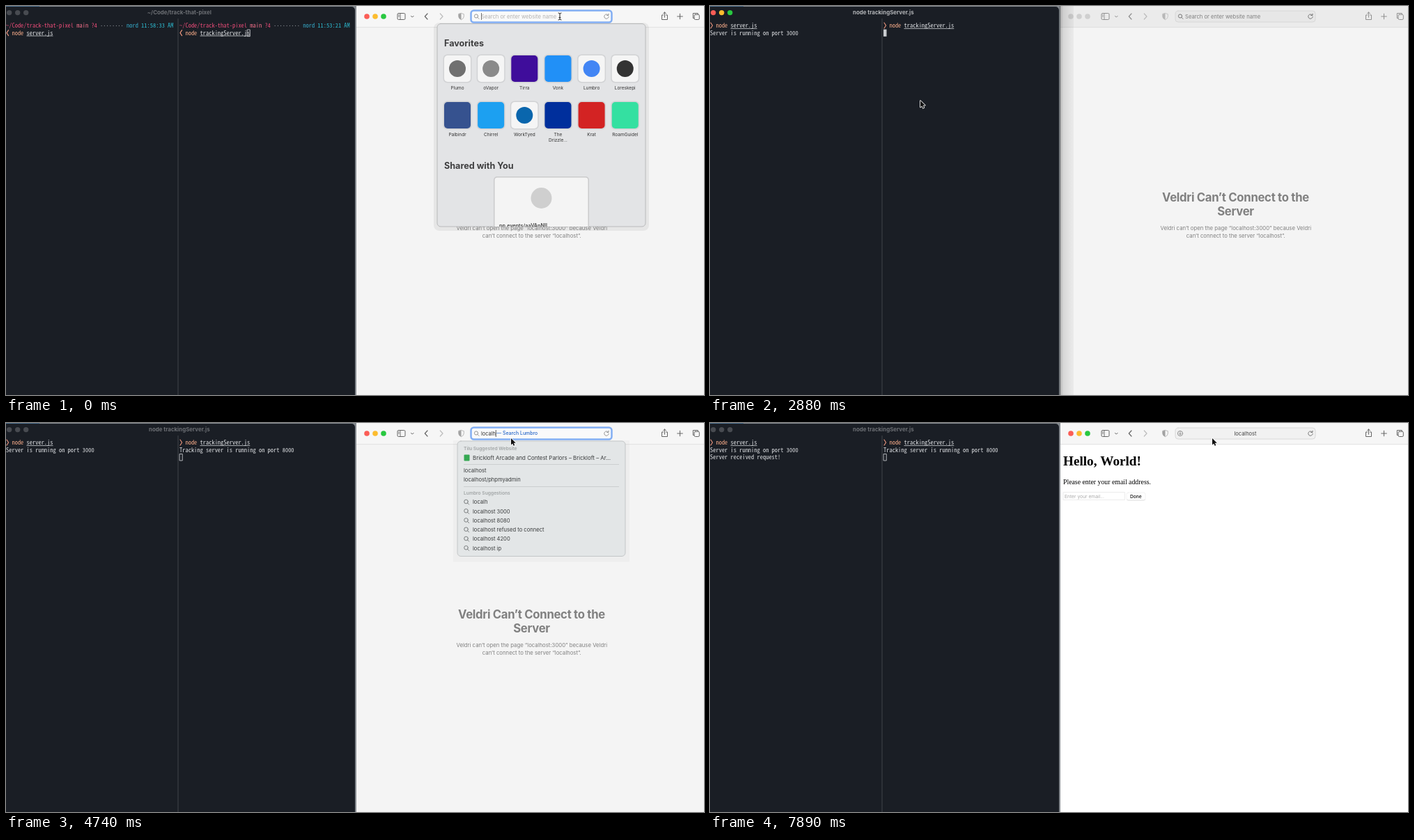
These frames come from a looping animation (1002 px wide and 559 px high, 8000 ms). An HTML page with a canvas:

```html
<!DOCTYPE html>
<html lang="en">
<head>
<meta charset="utf-8">
<title>Two servers and a browser</title>
<style>
html, body { margin: 0; width: 100%; height: 100%; overflow: hidden; }
canvas { display: block; }
</style>
</head>
<body>
<canvas id="stage" width="1002" height="559"></canvas>
<script>
const c = document.getElementById('stage').getContext('2d');
const LOOP = 8000;
const UI = 'Inter, "Open Sans", sans-serif';
const SERIF = '"Liberation Serif", serif';
const MONO = '8.45px "Noto Sans Mono CJK JP", "Noto Sans Mono", monospace';
const CELL = 4.22;
const URL_TEXT = 'localhost:3000';
const LIGHTS = ['#fb5d56', '#fcbc2e', '#28c840'];

// Moments at which something switches
const LEAVE = 760, LEFT_PANE = 1530, RUN_LEFT = 1830, LOG_LEFT = 2130, RIGHT_PANE = 2580,
  RUN_RIGHT = 2880, LOG_RIGHT = 3030, RETURN = 3480, ENTER = 6520, LOADED = 6670, DONE = 7150;

const pointer = [
  [0, 795, 15, 'beam'], [150, 770, 38], [300, 640, 80], [450, 420, 118, 'beam'],
  [610, 230, 130, 'beam'], [760, 130, 126, 'beam'], [910, 106, 124, 'beam'], [1060, 103, 124, 'beam'],
  [2280, 180, 130, 'beam'], [2430, 290, 137, 'beam'], [2580, 302, 136],
  [3030, 340, 130], [3180, 480, 90], [3330, 660, 40], [3480, 722, 18, 'beam'], [3630, 725, 22], [7890, 721, 22]
];
const typed = [
  [0, 0], [4080, 1], [4260, 2], [4410, 3], [4560, 5], [4740, 6], [5480, 7], [5630, 8],
  [5780, 9], [5930, 10], [6080, 11], [6220, 12], [6370, 14]
];
const latest = (keys, t) => keys.findLast(k => k[0] <= t);

function box(x, y, w, h, r, fill, line, width = 1) {
  c.beginPath();
  c.roundRect(x, y, w, h, r);
  if (fill) { c.fillStyle = fill; c.fill(); }
  if (line) { c.strokeStyle = line; c.lineWidth = width; c.stroke(); }
}
function disc(x, y, r, fill) {
  c.beginPath();
  c.arc(x, y, r, 0, 7);
  c.fillStyle = fill;
  c.fill();
}
function line(d, color, width = 1) {
  c.strokeStyle = color;
  c.lineWidth = width;
  c.lineCap = c.lineJoin = 'round';
  c.stroke(new Path2D(d));
}
// y is the middle of the capitals
function text(s, x, y, size, color, { weight = 400, align = 'left', family = UI, gap = 0 } = {}) {
  c.font = `${weight} ${size}px ${family}`;
  c.letterSpacing = gap + 'px';
  c.textAlign = align;
  c.fillStyle = color;
  c.fillText(s, x, y + size * .36);
  return c.measureText(s).width;
}
function mono(s, x, y, color) {
  c.font = MONO;
  c.textAlign = 'left';
  c.letterSpacing = '0px';
  c.letterSpacing = CELL - c.measureText('m').width + 'px';
  c.fillStyle = color;
  c.fillText(s, x, y + 3.2);
}
function lens(x, y, color, r = 2.6) {
  line(`M${x + r} ${y}a${r} ${r} 0 1 1 ${-2 * r} 0a${r} ${r} 0 1 1 ${2 * r} 0M${x + r * .75} ${y + r * .75}l2 2`, color, .9);
}

// ---------- terminal ----------

function command(x, y, file, arrow) {
  const tip = arrow === '>' ? 'l2.6 4-2.6 4' : 'm2.6 0l-2.6 4 2.6 4';
  line(`M${x + 1} ${y - 4}${tip}`, '#f39a80', 1.1);
  mono('node', x + 2 * CELL, y, '#f4a987');
  mono(file, x + 7 * CELL, y, '#e4e6e9');
  c.fillStyle = '#c9ccd0';
  c.fillRect(x + 7 * CELL, y + 4, file.length * CELL, .8);
}
function prompt(x, dots, time, file) {
  const parts = [
    ['~/Code/track-that-pixel', '#ea4c78'], ['main', '#f3708a'], ['?4', '#ea4c78'],
    ['.'.repeat(dots), '#a7abb1'], ['nord', '#35a9c8'], [time, '#2dbcd2']
  ];
  let col = 0;
  for (const [s, color] of parts) {
    const lift = s[0] === '.' ? 2.5 : 0;
    mono(s, x + col * CELL, 28 - lift, color);
    col += s.length + 1;
  }
  command(x, 38.6, file, '<');
}
function block(x, y, solid, letter) {
  if (!solid) return box(x + .5, y - 4.5, CELL - .5, 9.5, 0, null, '#c3c6ca', .9);
  box(x, y - 5, CELL + .3, 10.2, 0, '#c9ccd0');
  if (letter) mono(letter, x, y, '#1a1e25');
}
function terminal(t, active) {
  c.fillStyle = '#858a8f';
  c.fillRect(0, 0, 503, 559);
  c.fillStyle = '#4f718f';
  c.fillRect(0, 0, 48, 1);
  box(-6, 1, 507, 570, 5, '#1a1e25');
  for (let i = 0; i < 3; i++) disc(4.7 + 12 * i, 9.6, 3.7, active ? LIGHTS[i] : '#484b51');

  const title = t >= RUN_RIGHT ? 'node trackingServer.js'
    : t >= RUN_LEFT && t < RIGHT_PANE ? 'node server.js' : '~/Code/track-that-pixel';
  text(title, 248.8, 9.5, 7.9, active ? '#b3b5b8' : '#6c6f74', { weight: 700, align: 'center' });
  c.fillStyle = '#40444b';
  c.fillRect(246.5, 18, 1, 541);

  const left = 0, right = 249;
  if (t < RUN_LEFT) prompt(left, 8, '11:58:33 AM', 'server.js');
  else command(left, 28, 'server.js', '>');
  if (t >= LOG_LEFT) mono('Server is running on port 3000', left, 38.6, '#dfe1e4');
  if (t >= ENTER) mono('Server received request!', left, 49, '#dfe1e4');

  if (t < RUN_RIGHT) prompt(right, 9, '11:53:21 AM', 'trackingServer.js');
  else command(right, 28, 'trackingServer.js', '>');
  if (t >= LOG_RIGHT) mono('Tracking server is running on port 8000', right, 38.6, '#dfe1e4');

  if (t >= LEFT_PANE && t < RUN_LEFT) block(left + 15 * CELL, 38.6, active, 's');
  else if (t >= RUN_LEFT && t < RIGHT_PANE) block(left, t < LOG_LEFT ? 38.6 : 49, active);
  else if (t < RUN_RIGHT) block(right + 23 * CELL, 38.6, active, 's');
  else block(right, t < LOG_RIGHT ? 38.6 : 49, active);
}

// ---------- browser ----------

function page(t) {
  c.fillStyle = t >= LOADED ? '#fff' : '#f4f4f4';
  c.fillRect(503, 31, 499, 528);
  if (t >= LOADED) {
    text('Hello, World!', 507, 54.5, 19.2, '#000', { weight: 700, family: SERIF });
    text('Please enter your email address.', 507, 84.5, 9.8, '#000', { family: SERIF });
    box(507.5, 99.5, 88, 11, 0, '#fff', '#ececec');
    text('Enter your email...', 509, 105.5, 6.7, '#a9a9a9');
    box(598, 100.5, 27, 11, 2.5, '#dcdcdc');
    box(598, 100, 27, 10.5, 2.5, '#fff', '#ebebeb', .6);
    text('Done', 611.3, 105.5, 6.7, '#111', { weight: 500, align: 'center' });
    return;
  }
  const big = { weight: 700, align: 'center', gap: -.3 };
  const small = { align: 'center' };
  text('Veldri Can’t Connect to the', 754.5, 274.5, 16.7, '#808080', big);
  text('Server', 754.5, 295, 16.7, '#808080', big);
  text('Veldri can’t open the page “localhost:3000” because Veldri', 754.8, 319, 7.75, '#808080', small);
  text('can’t connect to the server “localhost”.', 754.8, 329.8, 7.75, '#808080', small);
}

function toolbar(t, active) {
  c.fillStyle = active ? '#f6f6f6' : '#ebebeb';
  c.fillRect(503, 0, 499, 31);
  c.fillStyle = '#dcdcdc';
  c.fillRect(503, 30.3, 499, .8);
  for (let i = 0; i < 3; i++) disc(518 + 12 * i, 15, 3.8, active ? LIGHTS[i] : '#cfcfcf');
  const ink = active ? '#666' : '#909090', faint = '#bcbcbc';
  box(562, 10.5, 11, 9, 1.5, null, ink);
  line('M566 10.5v9M563.5 13h1M563.5 15h1', ink, .9);
  line('M581.5 14.3l1.8 1.8 1.8-1.8', ink);
  line('M605 11l-3.7 4 3.7 4', ink, 1.2);
  line('M623.3 11l3.7 4-3.7 4', faint, 1.2);
  const shieldInk = active ? '#a2a2a2' : '#b8b8b8';
  c.fillStyle = shieldInk;
  c.fill(new Path2D('M653.5 10.4l-3.8 1.3v3.3q0 3 3.8 4.7z'));
  line('M653.5 10.4l3.8 1.3v3.3q0 3-3.8 4.7q-3.8-1.7-3.8-4.7v-3.3z', shieldInk, .7);
  const busy = t >= ENTER && t < DONE;
  line('M943.5 13h-2v6.5h8v-6.5h-2M945.5 16.3v-7.3M943.4 11l2.1-2.1 2.1 2.1', busy ? faint : ink);
  line('M963.7 15h7.6M967.5 11.2v7.6', ink);
  line('M987.5 17.5h-1.2v-7h7v1.2', ink);
  box(988, 12.3, 7.3, 7.2, 1.5, null, ink);
}

function addressBar(t, active, focused, count) {
  if (focused) box(667.5, 6.5, 202, 17, 4, '#fafafa', '#82aef3', 2.5);
  else box(668, 7, 201, 16, 4, active ? '#f1f1f1' : '#e7e7e7', '#d5d5d5', .9);
  const ink = focused ? '#8a8a8a' : '#6a6a6a';

  if (t >= ENTER && t < DONE) line('M859.6 12.4l5 5m0-5l-5 5', '#666');
  else {
    line('M864.6 13.2a3.2 3.2 0 1 0 .6 2.2', ink, .9);
    line('M865 11.2v2.3h-2.3', ink, .9);
  }

  if (t >= DONE) {
    line('M678.6 15a3.6 3.6 0 1 1-7.2 0a3.6 3.6 0 1 1 7.2 0M675 13v3.6M673.6 15.3l1.4 1.4 1.4-1.4', '#777', .8);
    return text('localhost', 768.5, 15, 7.5, '#444', { align: 'center' });
  }
  if (t >= ENTER) {
    disc(675.5, 15, 4, '#d3d3d3');
    line('M671.5 15h8M675.5 11v8M673.5 11.6q-1.4 3.4 0 6.8M677.5 11.6q1.4 3.4 0 6.8', '#efefef', .6);
    const width = text('localhost', 724, 15, 7.5, '#444');
    text(':3000', 724 + width, 15, 7.5, '#999');
    c.fillStyle = '#3b82e6';
    c.fillRect(670, 21.6, t < LOADED ? 26 : t < 6990 ? 110 : 190, 1.4);
    return;
  }
  lens(675, 14.5, ink);
  if (!count) {
    text('Search or enter website name', 682, 15, 7.65, focused ? '#b2b2b2' : '#808080');
    if (focused) { c.fillStyle = '#555'; c.fillRect(682, 10, .8, 10); }
    return;
  }
  const end = 682 + text(URL_TEXT.slice(0, count), 682, 15, 7.4, '#333');
  if (count > 2 && count < 10) text('— Search Lumbro', end + 1.5, 15, 6.9, '#2566c8', { weight: 500 });
  if (t < 5180 || t >= 5480) { c.fillStyle = '#333'; c.fillRect(end, 10, .8, 10); }
}

const sites = [
  ['Plumo', '#f5f5f5', '#707070'], ['oVapor', '#f5f5f5', '#8a8a8a'], ['Tirra', '#3f0d9b'],
  ['Vonk', '#2190f7'], ['Lumbro', '#f5f5f5', '#4285f4'], ['Loreskepi', '#f5f5f5', '#333'],
  ['Palbindr', '#36528f'], ['Chirrel', '#1ca0f1'], ['WorkTyed', '#f5f5f5', '#0a66ad'],
  ['The|Drizzle...', '#002f9c'], ['Krat', '#d32323'], ['RoamGuidel', '#34e0a1']
];
function favorites() {
  box(614, 24, 309, 299, 8, 'rgba(0,0,0,.06)');
  box(619, 25.5, 299, 291.5, 5, '#e3e4e6', '#b4b5b6', .9);
  c.save();
  c.clip();
  text('Favorites', 629, 53.5, 12.6, '#3e3e3f', { weight: 700 });
  sites.forEach(([name, tile, mark], i) => {
    const x = 648 + 48.15 * (i % 6), y = i < 6 ? 90 : 157;
    box(x - 20.5, y - 20.5, 41, 41, 6, '#d2d3d5');
    box(x - 19, y - 19, 38, 38, 5, tile);
    if (mark) disc(x, y, 12, mark);
    name.split('|').forEach((s, row) => text(s, x, y + 27.5 + 8.5 * row, 6.5, '#333', { align: 'center' }));
  });
  text('Shared with You', 629, 229, 12.6, '#3e3e3f', { weight: 700 });
  box(700, 245, 137, 90, 5, '#cbcbcc');
  box(701.5, 246.5, 134, 90, 4, '#f4f4f4');
  disc(768.5, 276, 15, '#cfcfcf');
  text('pp.events/aaVApNlI', 708, 315, 7.2, '#444', { weight: 600 });
  c.restore();
}

function suggestions(count) {
  const query = URL_TEXT.slice(0, count);
  const rows = count < 6
    ? [query, 'local time', 'local news', 'local weather', 'location', 'local events', 'localhost',
      'localhost 3000', 'localhost 8080', 'local map', 'local radio', 'locale']
    : [query, 'localhost 3000', 'localhost 8080', 'localhost refused to connect', 'localhost 4200', 'localhost ip'];
  const height = 86 + 13.25 * rows.length;
  box(642, 25, 253, height + 9, 0, 'rgba(0,0,0,.022)');
  box(648, 26, 241, height, 5, '#e3e6e7', '#bfc2c3', .9);
  const head = { weight: 600 };
  text('Tilu Suggested Website', 657, 37, 6.7, '#a1a5a6', head);
  box(657.5, 45.5, 8, 9, 1, '#35a853');
  text('Brickloft Arcade and Contest Parlors – Brickloft – Ar...', 670, 49.7, 7.9, '#3a3c3d');
  c.fillStyle = '#c6c9ca';
  c.fillRect(657, 59, 223, .8);
  c.fillRect(657, 91, 223, .8);
  text('localhost', 657, 68.5, 7.6, '#3a3c3d');
  text('localhost/phpmyadmin', 657, 81.7, 7.6, '#3a3c3d');
  text('Lumbro Suggestions', 657, 100.7, 6.7, '#a1a5a6', head);
  rows.forEach((s, i) => {
    const y = 113.7 + 13.25 * i;
    lens(660.5, y - .7, '#6d7071', 2.8);
    text(s, 670, y, 7.6, '#3a3c3d');
  });
}

// ---------- pointer ----------

function drawPointer([, x, y, kind]) {
  if (kind === 'beam') {
    const beam = `M${x - 2} ${y - 5}q2 0 2 1.4v7.2q0 1.4-2 1.4m4-10q-2 0-2 1.4m0 7.2q0 1.4 2 1.4M${x - 1} ${y + 1.5}h2`;
    const dark = x < 502;
    line(beam, dark ? '#1a1e25' : '#fff', 2.2);
    return line(beam, dark ? '#e6e6e6' : '#222', 1);
  }
  const arrow = new Path2D(`M${x} ${y}v9.4l2.2-2 1.5 3.4 1.6-.7-1.5-3.3h3z`);
  c.lineJoin = 'round';
  c.lineWidth = 1.6;
  c.strokeStyle = '#fff';
  c.stroke(arrow);
  c.fillStyle = '#111';
  c.fill(arrow);
}

function draw(t) {
  const active = t < LEAVE || t >= RETURN;
  const focused = active && t < ENTER;
  const count = latest(typed, t)[1];
  terminal(t, !active);
  page(t);
  toolbar(t, active);
  if (t < LEAVE) favorites();
  if (count > 2 && t < ENTER) suggestions(count);
  addressBar(t, active, focused, count);
  if (!active) {
    const shade = c.createLinearGradient(502, 0, 522, 0);
    shade.addColorStop(0, 'rgba(0,0,0,.3)');
    shade.addColorStop(.25, 'rgba(0,0,0,.12)');
    shade.addColorStop(1, 'rgba(0,0,0,.035)');
    c.fillStyle = shade;
    c.fillRect(502, 0, 20, 559);
  }
  drawPointer(latest(pointer, t));
}

const start = performance.now();
function frame() {
  draw((performance.now() - start) % LOOP);
  requestAnimationFrame(frame);
}
frame();
</script>
</body>
</html>
```
